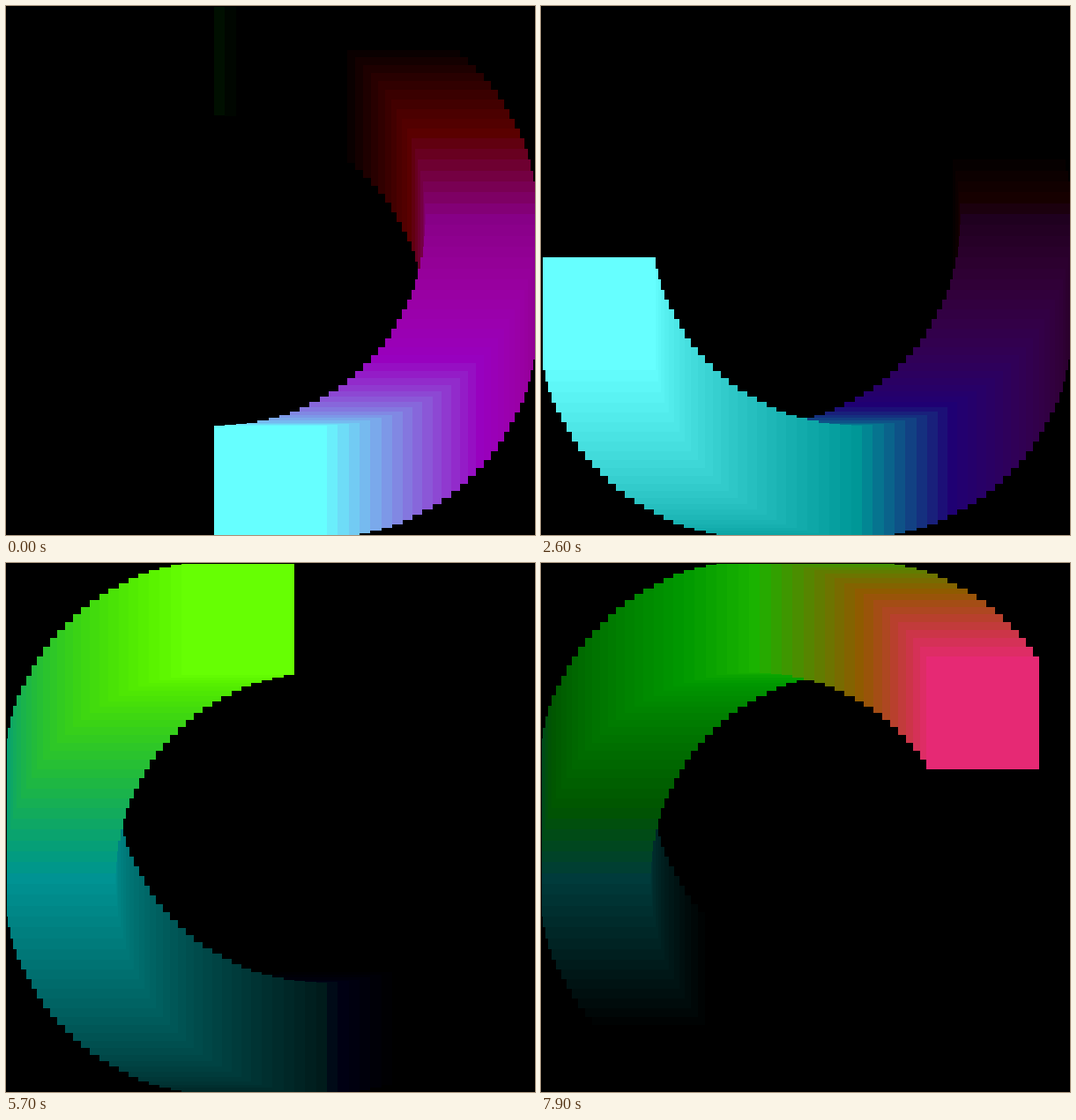
Write an HTML page with a canvas that moves like this. It is 600 px wide and 600 px high and loops after 8000 ms.

```html
<!DOCTYPE html>
<html lang="en">
<head>
<meta charset="utf-8">
<title>Orbiting square</title>
<style>
html, body { margin: 0; width: 100%; height: 100%; overflow: hidden; background: #000; }
canvas { display: block; }
</style>
</head>
<body>
<canvas id="stage" width="600" height="600"></canvas>
<script>
const ctx = document.getElementById('stage').getContext('2d');
const STEP_MS = 100, STEPS = 80, FIRST_STEP = -60;
const SIZE = 128, MID = 300, RADIUS = 240;
const FADE = 4, TRAIL = 63;

// The colour follows the angle: redder to the right, less blue towards the top.
function channels(cos, sin) {
  const right = Math.max(cos, 0), up = Math.max(-sin, 0);
  return [102 + 153 * right, 255 * (1 - right), 255 * (1 - up)];
}

function drawSquare(step, age) {
  const angle = (90 + 3 * step) * Math.PI / 180;
  const cos = Math.cos(angle), sin = Math.sin(angle);
  const rgb = channels(cos, sin).map(v => Math.max(0, Math.round(v) - FADE * age));
  ctx.fillStyle = `rgb(${rgb.join(',')})`;
  const corner = MID - SIZE / 2;
  ctx.fillRect(corner + Math.trunc(RADIUS * cos), corner + Math.trunc(RADIUS * sin), SIZE, SIZE);
}

function draw(step) {
  ctx.fillStyle = '#000';
  ctx.fillRect(0, 0, 600, 600);
  for (let age = Math.min(TRAIL, step - FIRST_STEP); age >= 0; age--) {
    drawSquare(step - age, age);
  }
}

// The top row and left column stay black.
ctx.beginPath();
ctx.rect(1, 1, 599, 599);
ctx.clip();

const start = performance.now();
let shown = 0;

function tick() {
  const step = Math.floor((performance.now() - start) / STEP_MS) % STEPS;
  if (step !== shown) draw(shown = step);
  requestAnimationFrame(tick);
}

draw(0);
requestAnimationFrame(tick);
</script>
</body>
</html>
```
